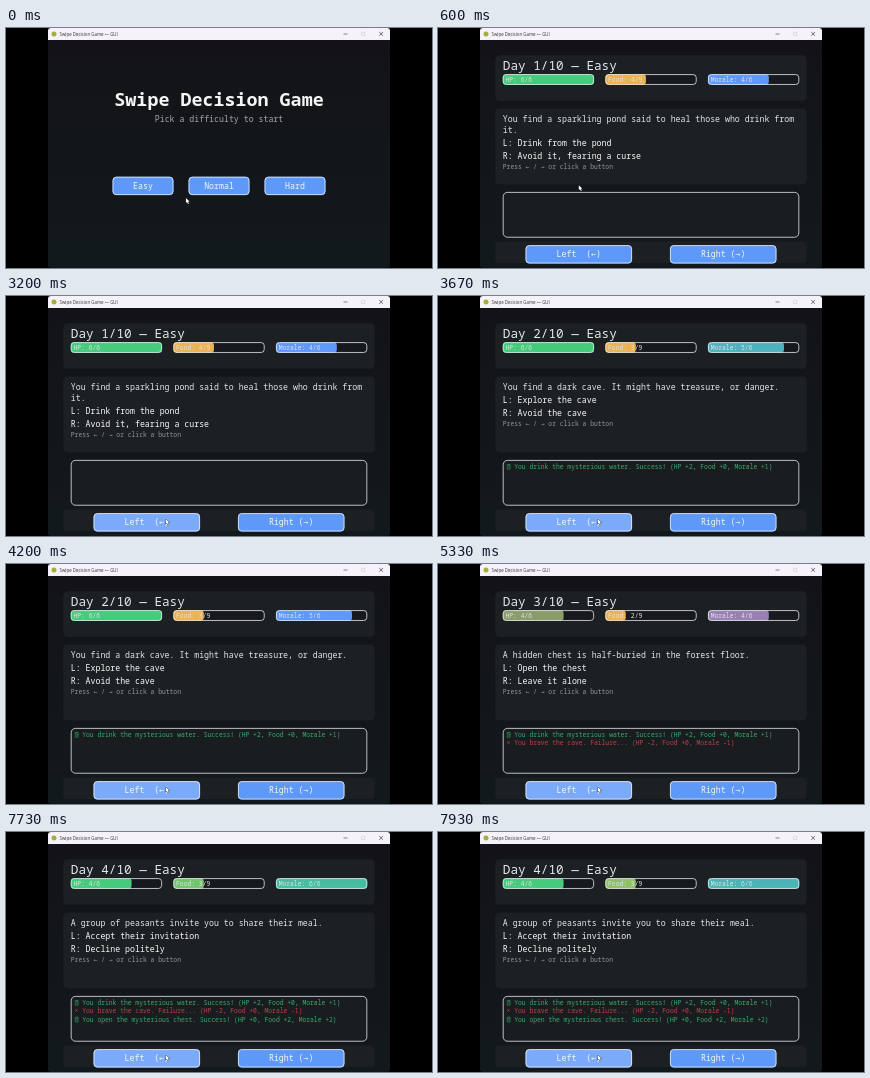
Animation of 426x240 px, one loop 8 s. Source, as an HTML page with a canvas:

```html
<!DOCTYPE html>
<html lang="en">
<head>
<meta charset="utf-8">
<title>Swipe Decision Game</title>
<style>
html, body { margin: 0; width: 100%; height: 100%; overflow: hidden; background: #000; }
canvas { display: block; width: 426px; height: 240px; }
</style>
</head>
<body>
<canvas id="stage" width="426" height="240"></canvas>
<script>
const ctx = document.getElementById('stage').getContext('2d');
const LOOP = 8000, GAME_START = 530, FLASH = 800;
// The game area is laid out on a 900 x 600 grid below the title bar.
const LEFT = 42, TOP = 12, SCALE = 0.38;
const MONO = '"Noto Sans Mono", monospace';
const ARROWS = '"DejaVu Sans Mono", monospace';
const SANS = '"Open Sans", sans-serif';
const SMALL = 16.67, BODY = 21.67, HEAD = 33.33, TITLE = 48.33;
const GREEN = [70, 202, 124], ORANGE = [236, 178, 82], BLUE = [94, 152, 250];
const GAIN = [60, 205, 120], LOSS = [235, 90, 80];
const INK = '#e4e6ea', BRIGHT = '#fafafc', MUTED = '#92959a';
const PANEL = '#1c2023', EDGE = '#f0f2f6';

const menu = ['Easy', 'Normal', 'Hard'].map((label, i) => (
  { label, box: [170 + i * 200, 360, 160, 48] }
));
const choices = ['Left  (←)', 'Right (→)'].map((label, i) => (
  { label, box: [120 + i * 380, 540, 280, 48] }
));

// stats and change are ordered HP, Food, Morale
const days = [
  { at: GAME_START, stats: [6, 4, 4], change: [0, 0, 0],
    story: ['You find a sparkling pond said to heal those who drink from', 'it.'],
    left: 'Drink from the pond', right: 'Avoid it, fearing a curse' },
  { at: 3400, stats: [6, 3, 5], change: [2, 0, 1],
    story: ['You find a dark cave. It might have treasure, or danger.'],
    left: 'Explore the cave', right: 'Avoid the cave',
    log: 'You drink the mysterious water. Success!' },
  { at: 5000, stats: [4, 2, 4], change: [-2, 0, -1],
    story: ['A hidden chest is half-buried in the forest floor.'],
    left: 'Open the chest', right: 'Leave it alone',
    log: 'You brave the cave. Failure...' },
  { at: 7730, stats: [4, 3, 6], change: [0, 2, 2],
    story: ['A group of peasants invite you to share their meal.'],
    left: 'Accept their invitation', right: 'Decline politely',
    log: 'You open the mysterious chest. Success!' }
];
const bars = [
  { name: 'HP', max: 6, x: 60, color: GREEN },
  { name: 'Food', max: 9, x: 330, color: ORANGE },
  { name: 'Morale', max: 6, x: 600, color: BLUE }
];
const moves = [
  { from: 70, to: 470, a: [363, 416], b: [260, 382] },
  { from: 2730, to: 3190, a: [260, 382], b: [310, 555] }
];

const clamp = v => Math.max(0, Math.min(1, v));
const mix = (a, b, k) => a + (b - a) * k;
const rgb = (a, b, k) => `rgb(${a.map((v, i) => Math.round(mix(v, b[i], k)))})`;
const signed = n => (n < 0 ? '' : '+') + n;

function text(str, x, y, size, color = INK, align = 'left', family = MONO, weight = 400) {
  ctx.font = `${weight} ${size}px ${family}`;
  ctx.textAlign = align;
  ctx.fillStyle = color;
  ctx.fillText(str, x, y);
}

// Arrows come from a second monospaced font with larger arrow glyphs.
function arrowText(str, x, y, size, color, align) {
  text(str.replace(/[←→]/g, '\u00a0'), x, y, size, color, align);
  text(str.replace(/[^←→]/g, '\u00a0'), x, y, size, color, align, ARROWS);
}

function roundBox(x, y, w, h, r, fill) {
  ctx.beginPath();
  ctx.roundRect(x, y, w, h, r);
  ctx.fillStyle = fill;
  ctx.fill();
}

function frame(x, y, w, h, r, color = EDGE, line = 2) {
  ctx.beginPath();
  ctx.roundRect(x + line / 2, y + line / 2, w - line, h - line, r);
  ctx.strokeStyle = color;
  ctx.lineWidth = line;
  ctx.stroke();
}

function strokePath(points, color, width) {
  ctx.beginPath();
  points.forEach(([x, y, pen]) => pen ? ctx.moveTo(x, y) : ctx.lineTo(x, y));
  ctx.strokeStyle = color;
  ctx.lineWidth = width;
  ctx.stroke();
}

function drawWindow() {
  ctx.fillStyle = '#000';
  ctx.fillRect(0, 0, 426, 240);
  const shade = ctx.createLinearGradient(0, TOP, 0, 240);
  shade.addColorStop(0, '#131317');
  shade.addColorStop(1, '#12191c');
  roundBox(LEFT, 0, 342, 240, [0, 0, 3, 3], shade);
  roundBox(LEFT, 0, 342, TOP, [3, 3, 0, 0], '#f5f3f9');
  ctx.beginPath();
  ctx.arc(48, 6, 2.5, 0, Math.PI * 2);
  ctx.fillStyle = '#a5ae35';
  ctx.fill();
  text('Swipe Decision Game — GUI', 53.5, 7.7, 4.4, '#333338', 'left', SANS);
  strokePath([[337.5, 6, 1], [341.5, 6]], '#55555a', 0.7);
  frame(355.2, 3.9, 4, 4, 0.5, '#c9c9ce', 0.6);
  strokePath([[373.2, 4, 1], [377, 7.8], [377, 4, 1], [373.2, 7.8]], '#3c3c40', 0.7);
}

function drawButton({ label, box: [x, y, w, h] }, [mx, my]) {
  const hover = mx >= x && mx <= x + w && my >= y && my <= y + h;
  roundBox(x, y, w, h, 10, hover ? '#7caafa' : '#5e98f8');
  frame(x, y, w, h, 9);
  arrowText(label, x + w / 2, y + h / 2 + 7, BODY, '#f5f7fb', 'center');
}

function drawMenu(mouse) {
  text('Swipe Decision Game', 450, 174, TITLE, '#f5f5f5', 'center', MONO, 700);
  text('Pick a difficulty to start', 450, 216, BODY, '#a5a7ab', 'center');
  menu.forEach(b => drawButton(b, mouse));
}

function drawBar({ name, max, x, color }, value, change, fade) {
  const y = 90, w = 240, h = 28, r = 8;
  roundBox(x, y, w, h, r, '#17191d');
  roundBox(x, y, w * value / max, h, r, rgb(color, change < 0 ? LOSS : GAIN, change ? fade : 0));
  frame(x, y, w, h, r);
  text(`${name}: ${value}/${max}`, x + 7, 109.5, SMALL, '#dfe2e6');
}

function drawLog(entries) {
  entries.forEach(({ log, change: [hp, food, morale] }, i) => {
    const good = hp + food + morale > 0;
    const y = 424 + i * 22;
    const color = good ? '#39a96c' : '#bb404b';
    if (good) {
      frame(71, y - 13, 9, 14, 0, color, 1.5);
      strokePath([[74, y - 9, 1], [77, y - 9], [75.5, y - 3]], color, 1.3);
    } else {
      text('×', 70, y, SMALL, color);
    }
    text(`${log} (HP ${signed(hp)}, Food ${signed(food)}, Morale ${signed(morale)})`, 90, y, SMALL, color);
  });
}

function drawGame(t, mouse) {
  const past = days.filter(d => t >= d.at);
  const day = past[past.length - 1];
  const fade = 0.7 * (1 - clamp((t - day.at) / FLASH));

  roundBox(40, 40, 820, 120, 12, PANEL);
  text(`Day ${past.length}/10 — Easy`, 60, 80, HEAD);
  bars.forEach((b, i) => drawBar(b, day.stats[i], day.change[i], fade));

  roundBox(40, 180, 820, 200, 12, PANEL);
  day.story.forEach((line, i) => text(line, 60, 217 + i * 28, BODY));
  const y = 251 + (day.story.length - 1) * 28;
  text('L: ' + day.left, 60, y, BODY, BRIGHT);
  text('R: ' + day.right, 60, y + 34, BODY, BRIGHT);
  arrowText('Press ← / → or click a button', 60, y + 60, SMALL, MUTED);

  roundBox(60, 400, 780, 120, 12, '#1a1d20');
  frame(60, 400, 780, 120, 11);
  drawLog(past.slice(1));

  roundBox(40, 530, 820, 57, 12, PANEL);
  choices.forEach(b => drawButton(b, mouse));
}

function mouseAt(t) {
  const m = t < moves[1].from ? moves[0] : moves[1];
  const k = clamp((t - m.from) / (m.to - m.from));
  const ease = k * k * (3 - 2 * k);
  return m.a.map((v, i) => mix(v, m.b[i], ease));
}

function drawCursor([x, y]) {
  const shape = [[0, 0], [0, 13], [3, 10.5], [5.5, 15.5], [8, 14.5], [5.5, 9.7], [9.5, 9.2]];
  ctx.beginPath();
  shape.forEach(([dx, dy]) => ctx.lineTo(x + dx, y + dy));
  ctx.closePath();
  ctx.strokeStyle = '#101010';
  ctx.lineWidth = 1.8;
  ctx.stroke();
  ctx.fillStyle = '#fff';
  ctx.fill();
}

function draw(now) {
  const t = now % LOOP;
  const mouse = mouseAt(t);
  drawWindow();
  ctx.save();
  ctx.translate(LEFT, TOP);
  ctx.scale(SCALE, SCALE);
  if (t < GAME_START) drawMenu(mouse);
  else drawGame(t, mouse);
  drawCursor(mouse);
  ctx.restore();
}

let start;
function tick(now) {
  start ??= now;
  draw(now - start);
  requestAnimationFrame(tick);
}
draw(0);
requestAnimationFrame(tick);
</script>
</body>
</html>
```
